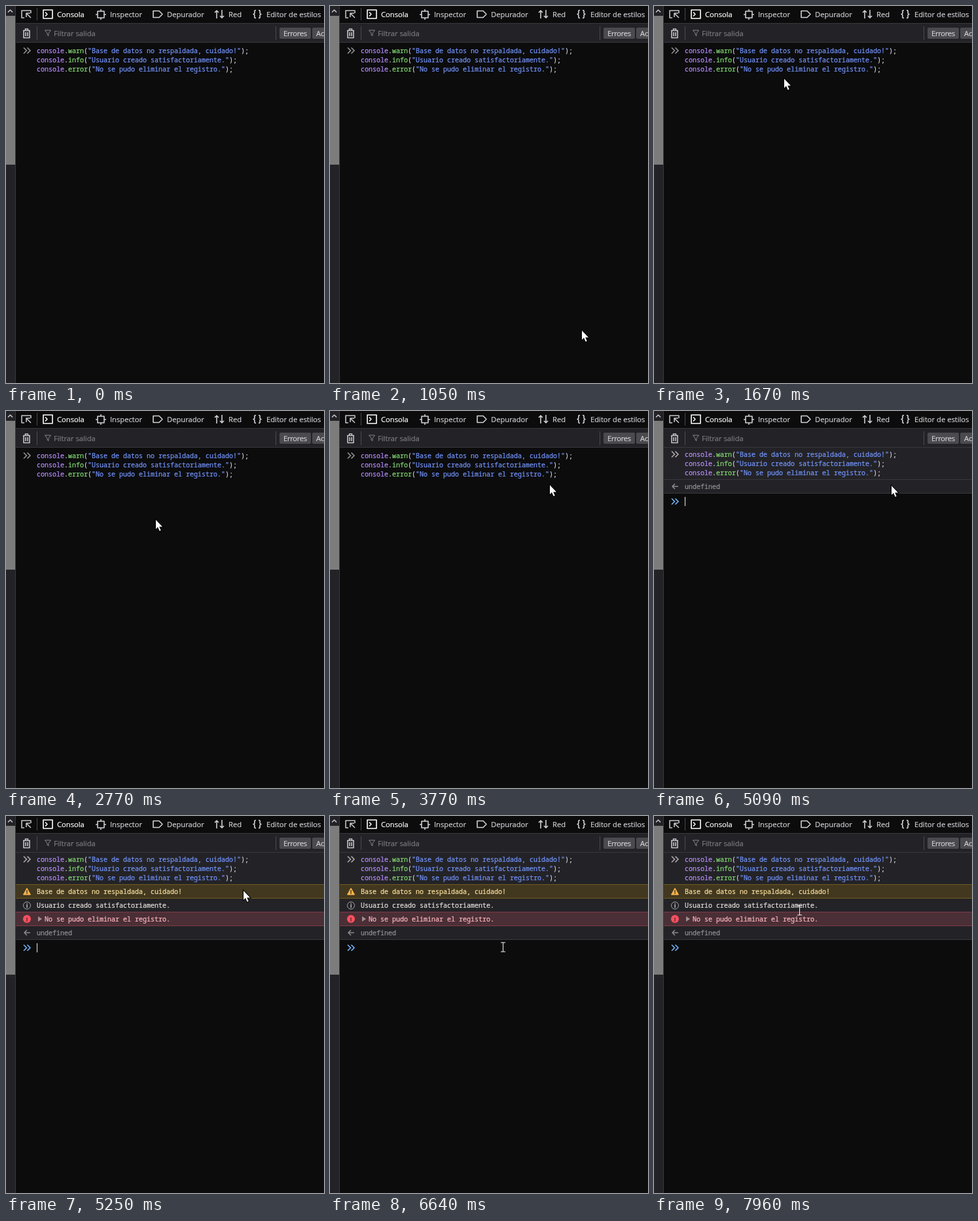
Recreate the animation shown at these times as an HTML page. Size 486x575 px, loop 8000 ms.

```html
<!DOCTYPE html>
<html lang="es">
<head>
<meta charset="utf-8">
<title>Consola</title>
<style>
html, body { margin: 0; width: 100%; height: 100%; overflow: hidden; background: #0c0c0d }
svg { display: block; width: 486px; height: 575px }
text, tspan { fill: currentColor; stroke: currentColor; stroke-width: .2px }
.ui { font: 11.2px "Open Sans", "Noto Sans", sans-serif; color: #d0d0d4 }
.mono { font: 10px "Noto Sans Mono", "DejaVu Sans Mono", monospace; color: #d7d7db }
.badge { font: bold 9px "Open Sans", sans-serif; text-anchor: middle }
.icon { fill: none; stroke: #c4c4c8; stroke-width: 1.6; stroke-linejoin: round }
.var { color: #b98eff }
.prop { color: #86de74 }
.str { color: #7596ff }
</style>
</head>
<body>
<svg viewBox="0 0 486 575">
  <defs>
    <path id="chev" fill="none" stroke-width="1.6" d="M27 -4.5l4.5 4.5l-4.5 4.5m5.500 -9l4.500 4.500l-4.500 4.500"/>
  </defs>

  <!-- page scrollbar and panel edges -->
  <rect width="14" height="575" fill="#232327"/>
  <rect y="15" width="14" height="227" fill="#7c7c7c"/>
  <path class="icon" d="M3 9.500l3.500 -3.500l3.500 3.500"/>
  <rect x="15" y="27" width="471" height="28" fill="#232327"/>
  <path stroke="#38383d" d="M14.500 0v575M15 26.500h471M15 55.500h471"/>
  <path stroke="#4a4a4f" d="M47.500 3v19M47.500 31v21M412.500 31v21"/>

  <!-- toolbars -->
  <g class="icon">
    <path d="M28 18h-4v-11h14v4M31 11l7 7M31 17v-6h6"/>
    <path d="M26 37.500h11M29.500 37v-2h4v2M27 38v10.500h9v-10.500M30 40v6M33 40v6"/>
    <path stroke="#86868a" stroke-width="1" d="M59.500 37h9l-3.500 4.500v4l-2 -1.500v-2.500z"/>
  </g>
  <g id="tabs" class="ui"></g>
  <g class="ui">
    <text x="73" y="46" color="#7b7b80">Filtrar salida</text>
    <rect x="418" y="33" width="48" height="17" rx="2" fill="#4a4a4f"/>
    <rect x="468" y="33" width="30" height="17" rx="2" fill="#4a4a4f"/>
    <text x="424" y="46" textLength="36">Errores</text>
    <text x="474" y="46">Ac</text>
  </g>

  <!-- console -->
  <rect id="echo" x="15" y="56" width="471" height="48" fill="#232327"/>
  <g id="input">
    <use id="inChev" href="#chev" y="68"/>
    <g id="code" class="mono"></g>
  </g>
  <g id="result" class="mono"></g>
  <g id="logs" class="mono"></g>
  <use id="prompt" href="#chev" stroke="#75b5f5"/>
  <rect id="caret" width="1" height="14" fill="#e8e8ea"/>

  <g id="mouse">
    <path id="arrow" fill="#fff" stroke="#000" stroke-width="2" paint-order="stroke" d="M0 0v14l3 -3l2.700 6l2 -1l-2.500 -5.500h4.800z"/>
    <path id="beam" fill="none" stroke="#f4f4f4" d="M-3 -7h7M.5 -7v14M-3 7h7"/>
  </g>
</svg>
<script>
const $ = id => document.getElementById(id);
const show = (id, on) => $(id).setAttribute('visibility', on ? 'visible' : 'hidden');
const place = (id, x, y) => $(id).setAttribute('transform', `translate(${x} ${y})`);

const tabs = [
  [78, 'Consola', 'M-21 6h14v13h-14zM-18 9.5l3 3l-3 3'],
  [159, 'Inspector', 'M-19 8h10v10h-10zM-14 8v-3M-14 18v3M-19 13h-3M-9 13h3'],
  [246, 'Depurador', 'M-21 7.5h9l5 5l-5 5h-9z'],
  [340, 'Red', 'M-18 19v-12M-21 10l3 -3l3 3M-10 6v12M-13 15l3 3l3 -3'],
  [398, 'Editor de estilos', 'M-16 6.5q-3 0 -2 3q0 3 -2 3q2 0 2 3q-1 3 2 3M-12 6.5q3 0 2 3q0 3 2 3q-2 0 -2 3q1 3 -2 3']
];
$('tabs').innerHTML = tabs.map(([x, label, icon], i) => {
  const color = i ? '#d0d0d4' : '#fff';
  return `<g transform="translate(${x})" color="${color}"><text y="17">${label}</text>` +
    `<path class="icon" style="stroke:${color}" d="${icon}"/></g>`;
}).join('');

const warning = 'Base de datos no respaldada, cuidado!';
const info = 'Usuario creado satisfactoriamente.';
const error = 'No se pudo eliminar el registro.';

$('code').innerHTML = Object.entries({ warn: warning, info, error }).map(([fn, msg], i) =>
  `<text x="47" y="${72 + 14 * i}"><tspan class="var">console</tspan>.` +
  `<tspan class="prop">${fn}</tspan>(<tspan class="str">"${msg}"</tspan>);</text>`).join('');

// One output row, ROW pixels high, with optional border lines
const ROW = 21, TOP = 104;
const row = (i, bg, line, color, icon, msg, x = 47) =>
  `<g transform="translate(0 ${TOP + ROW * i})">` +
  `<rect x="15" y="1" width="471" height="${ROW - 1}" fill="${bg}"/>` +
  `<path stroke="${line}" d="M15 .5h471m-471 ${ROW}h471"/>` +
  `${icon}<text x="${x}" y="15" color="${color}">${msg}</text></g>`;
const badge = (sign, color) => `<text class="badge" x="32" y="14.5" color="${color}">${sign}</text>`;

$('logs').innerHTML =
  row(0, '#42381f', '#715b22', '#fce2a1',
    '<path fill="#ffb44c" stroke="#ffb44c" stroke-linejoin="round" d="M32 6l5.5 10h-11z"/>' + badge('!', '#42381f'), warning) +
  row(1, '#232327', 'none', '#e6e2dc',
    '<circle cx="32" cy="11.5" r="5.5" fill="none" stroke="#a8a8ac"/>' + badge('i', '#b8b8bc'), info) +
  row(2, '#4b2f36', '#7d3b47', '#ffb9c4',
    '<circle cx="32" cy="11" r="6" fill="#ff4f5e"/>' + badge('!', '#4b2f36') +
    '<path fill="#a18f93" d="M49 7l6 4l-6 4z"/>', error, 59);
$('result').innerHTML = row(0, '#232327', '#38383d', '#939395',
  '<path class="icon" style="stroke:#8a8a8e" stroke-width="1.3" d="M37 11h-9m4 -4l-4 4l4 4"/>', 'undefined');

// Pointer glides: start, end, target x and y, sideways bend
const moves = [
  [900, 1670, 199, 111, 0],
  [1760, 2530, 224, 154, 0.7],
  [2600, 2680, 229, 166, 0],
  [3230, 4070, 363, 114, -0.1],
  [6030, 6640, 264, 200, 0],
  [6720, 6790, 228, 150, 0],
  [6870, 7190, 190, 140, 0],
  [7420, 7960, 222, 144, 0]
];
const CLICK = 3870, SEND = 5020, RESULT = 5090, LOGS = 5250;
const STEP = 77, BLINK = 520;

// Eased glide in small steps; null before the pointer appears
function pointer(t) {
  if (t < moves[0][0]) return null;
  let x = 407, y = 540;
  for (const [from, to, tx, ty, bend] of moves) {
    if (t < from) break;
    const held = Math.floor((t - from) / STEP + 1) * STEP;
    const u = Math.min(1, held / (to - from));
    const ease = u * u * (3 - 2 * u), side = bend * Math.sin(Math.PI * u);
    const dx = tx - x, dy = ty - y;
    x += dx * ease - dy * side;
    y += dy * ease + dx * side;
  }
  return [Math.round(x), Math.round(y)];
}

function draw(now) {
  const t = now % 8000;
  const sent = t >= SEND, focused = t >= CLICK;
  const rows = t >= LOGS ? 4 : t >= RESULT ? 1 : 0;
  const top = TOP + 1 + ROW * rows;

  show('echo', sent);
  place('input', 0, sent ? -2 : 0);
  $('inChev').setAttribute('stroke', sent ? '#b1a9ac' : focused ? '#75b5f5' : '#939395');

  show('logs', rows > 1);
  show('result', rows);
  place('result', 0, ROW * (rows - 1));
  show('prompt', sent);
  place('prompt', 0, top + 12);

  const idle = t - (sent ? SEND : CLICK);
  show('caret', focused && Math.floor(idle / BLINK) % 2 === 0);
  place('caret', sent ? 47 : 347, sent ? top + 5 : 89);

  const pos = pointer(t), beam = t >= 6550;
  show('arrow', pos && !beam);
  show('beam', pos && beam);
  if (pos) place('mouse', ...pos);
  requestAnimationFrame(draw);
}
draw(0);
</script>
</body>
</html>
```
